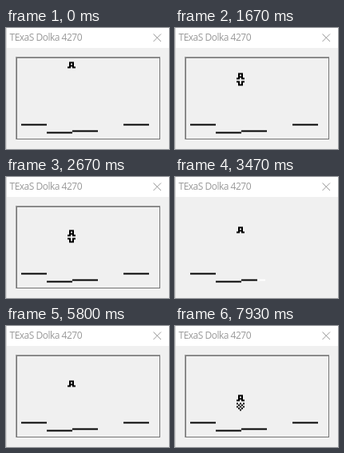
Animation of 204 by 152 pixels, one loop 8000 ms. Source, as an HTML page:

```html
<!DOCTYPE html>
<html lang="en">
<head>
<meta charset="utf-8">
<title>Lander</title>
<style>
  html, body { margin: 0; width: 100%; height: 100%; overflow: hidden; background: #f0f0f0; }
  svg { display: block; width: 100%; height: 100%; }
  .crisp { shape-rendering: crispEdges; }
  text { font: 12px "Open Sans", "Noto Sans", sans-serif; letter-spacing: -.5px; fill: #999; }
</style>
</head>
<body>
<svg viewBox="0 0 204 152">
  <rect width="204" height="152" fill="#f0f0f0"/>
  <rect width="204" height="25" fill="#fff"/>
  <text x="4.5" y="16">TExaS Dolka 4270</text>
  <path d="M184.5 7.5l9.5 9.5m0-9.5l-9.5 9.5" stroke="#999"/>
  <rect class="crisp" width="1" height="152" fill="#d6d6d6"/>

  <g id="frame" class="crisp" fill="none">
    <path d="M12.5 140V36.5H193" stroke="#a0a0a0"/>
    <rect x="13.5" y="37.5" width="179" height="102" stroke="#767676"/>
  </g>

  <!-- LCD: one cell is two pixels -->
  <g transform="translate(19 42.5) scale(2)">
    <path d="M0 39h16v1h-16zM16 44h16v1h-16z"/>
    <rect id="pad3" x="32" y="43" width="16" height="1"/>
    <rect id="pad4" x="64" y="39" width="16" height="1"/>
    <rect id="gap" x="42" y="43" width="5" height="1" fill="#fff"/>
    <path id="thin" d="M16 44h16v.5h-16zM32 43.5h16v.5h-16z" fill="#858585"/>
    <g id="ship">
      <path id="body"/>
      <path id="small"/>
      <path id="large"/>
    </g>
  </g>
</svg>
<script>
const LOOP = 8000;
const el = id => document.getElementById(id);
const show = (id, on) => el(id).setAttribute('visibility', on ? 'visible' : 'hidden');

const sprite = (id, top, ...rows) => el(id).setAttribute('d', rows.map((row, y) =>
  [...row].map((c, x) => c === '#' ? `M${x} ${top + y}h1v1h-1z` : '').join('')
).join(''));
sprite('body', 0, '.###.', '.#.#.', '.###.', '##.##');
sprite('small', 5, '##.##', '.#.#.', '.###.');
sprite('large', 5, '#.#.#', '.#.#.', '#.#.#', '.#.#.', '..#..');

// Flight path: [time, depth in cells]
const path = [[0, .1], [670, 2], [1670, 7], [2600, 12.2], [3330, 10.9], [4000, 10.1],
  [4930, 11], [5800, 13], [6000, 14], [7000, 19.2], [7530, 22], [LOOP, 22.3]];

function depth(t) {
  const i = path.findIndex(([end]) => t < end);
  const [t0, y0] = path[i - 1], [t1, y1] = path[i];
  return Math.floor(y0 + (y1 - y0) * (t - t0) / (t1 - t0));
}

// True for the first `length` ms of every period
const pulse = (t, first, period, length) => t >= first && (t - first) % period < length;

function draw(t) {
  const braking = t >= 1470 && t < 3400;
  const landing = t >= 6870;
  const blank = pulse(t, 1610, 1860, 60);
  el('ship').setAttribute('transform', `translate(29 ${depth(t)})`);
  show('small', braking);
  show('large', landing);
  show('frame', !blank);
  show('pad4', !blank);
  show('gap', blank);
  show('thin', !blank && pulse(t, 130, 400, 70));
  el('pad3').setAttribute('width', blank ? 10 : 16);
}

const start = performance.now();
function tick() {
  draw((performance.now() - start) % LOOP);
  requestAnimationFrame(tick);
}
tick();
</script>
</body>
</html>
```
